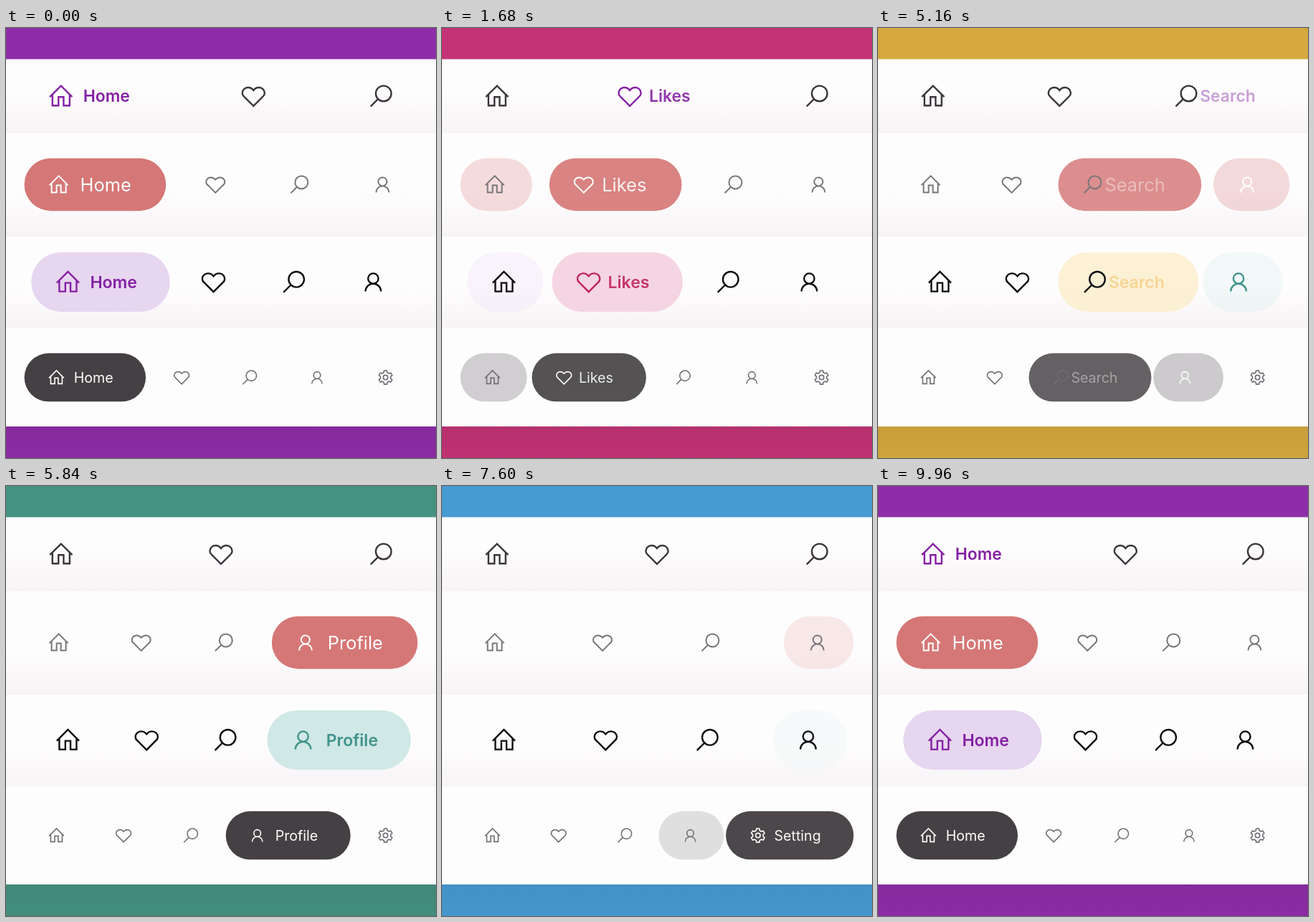
Write an HTML page with a canvas that moves like this. It is 600x600 px and loops after 10000 ms.

```html
<!DOCTYPE html>
<html lang="en">
<head>
<meta charset="utf-8">
<title>Tab bars</title>
<style>
html, body { margin: 0; width: 100%; height: 100%; overflow: hidden; background: #fff; }
canvas { display: block; width: 600px; height: 600px; }
</style>
</head>
<body>
<canvas id="stage" width="600" height="600"></canvas>
<script>
const ctx = document.getElementById('stage').getContext('2d');
const LOOP = 10000, SPAN = 750;
const FACE = 'Inter, "Open Sans", sans-serif';
const LABELS = ['Home', 'Likes', 'Search', 'Profile', 'Setting'];
const BACKS = [[142, 45, 168], [214, 53, 100], [244, 174, 48], [68, 146, 130], [71, 157, 226]];
const STEPS = [[1120, 1], [3020, 2], [5030, 3], [6970, 4], [8160, 0]]; // time, selected tab

const WHITE = [255, 255, 255], PURPLE = [132, 32, 164];
const same = c => Array(5).fill(c);
const TINTS = [PURPLE, [193, 36, 94], [243, 177, 58], [63, 147, 138], WHITE];
const PILLS = [[231, 214, 239], [244, 209, 223], [252, 238, 204], [208, 232, 230], WHITE];

const ROWS = [
  { count: 3, y: 95, left: 25.6, icon: 38.4, height: 0, gap: 25.6, pad: 45.8,
    weight: 600, home: 62.5, idle: [58, 54, 59], tint: same(PURPLE), pill: null },
  { count: 4, y: 218.4, left: 25.6, icon: 32, height: 73.5, gap: 30.5, pad: 48.5,
    weight: 400, home: 68, idle: [120, 117, 122], tint: same(WHITE), pill: same([213, 119, 118]) },
  { count: 4, y: 354.4, left: 35.2, icon: 38.4, height: 83, gap: 25.6, pad: 45.8,
    weight: 600, home: 63, idle: [14, 13, 18], tint: TINTS, pill: PILLS },
  { count: 5, y: 487.6, left: 25.6, icon: 25.6, height: 67.5, gap: 25, pad: 45.5,
    weight: 400, home: 52.5, idle: [114, 111, 116], tint: same(WHITE), pill: same([68, 64, 67]) }
];

// Icons on a 32-unit grid, stroked with a 2-unit pen
function gear() {
  let d = '';
  const put = (r, deg) => {
    const a = deg * Math.PI / 180;
    d += (d ? 'L' : 'M') + (16 + r * Math.cos(a)) + ' ' + (16 + r * Math.sin(a));
  };
  for (let a = -90; a < 270; a += 60) {
    put(9.2, a - 19); put(12.2, a - 11.5); put(12.2, a + 11.5); put(9.2, a + 19);
  }
  return d + 'Z M20 16a4 4 0 1 1-8 0a4 4 0 1 1 8 0z';
}
const ICONS = [
  'M3 17L16 4L29 17M6 14.4V27H13V17H19V27H26V14.4',
  'M9.5 6C5.9 6 3 8.9 3 12.5C3 15 5.2 16.7 5.2 16.7L16 27.5L26.8 16.7S29 15 29 12.5C29 8.9 26.1 6 22.5 6C18.5 6 16 9.3 16 9.3S13.5 6 9.5 6Z',
  'M28 13a9 9 0 1 1-18 0a9 9 0 1 1 18 0zM12.6 19.4L4 28',
  'M21 12a6 6 0 1 1-12 0a6 6 0 1 1 12 0zM6 27a9 9 0 0 1 18 0',
  gear()
].map(d => new Path2D(d));

const clamp = v => Math.max(0, Math.min(1, v));
const mix = (a, b, k) => a.map((v, i) => v + (b[i] - v) * k);
const css = (c, alpha = 1) => `rgba(${c.map(Math.round).join(',')},${alpha})`;

function bezier(x1, y1, x2, y2) {
  const at = (a, b, s) => 3 * (1 - s) * (1 - s) * s * a + 3 * (1 - s) * s * s * b + s * s * s;
  return x => {
    if (x <= 0 || x >= 1) return clamp(x);
    let lo = 0, hi = 1;
    for (let i = 0; i < 24; i++) {
      const m = (lo + hi) / 2;
      if (at(x1, x2, m) < x) lo = m; else hi = m;
    }
    return at(y1, y2, lo);
  };
}
const grow = bezier(0.4, 0, 0.2, 1);
const easeOut = bezier(0, 0, 0.58, 1);

// Size each row's type from the width of its first label
function measure() {
  for (const row of ROWS) {
    ctx.font = `${row.weight} 100px ${FACE}`;
    const m = ctx.measureText('Home');
    row.size = row.home / (m.actualBoundingBoxLeft + m.actualBoundingBoxRight) * 100;
    row.font = `${row.weight} ${row.size}px ${FACE}`;
    ctx.font = row.font;
    row.text = LABELS.map(s => ctx.measureText(s).width);
  }
}

function stateAt(t) {
  let cur = 0, prev = 4, x = 1;
  for (const [start, tab] of STEPS) {
    if (t < start) break;
    prev = cur;
    cur = tab;
    x = clamp((t - start) / SPAN);
  }
  return { cur, prev, x, open: grow(x) };
}

function fade(y0, y1, from, to) {
  const g = ctx.createLinearGradient(0, y0, 0, y1);
  g.addColorStop(0, from);
  g.addColorStop(1, to);
  ctx.fillStyle = g;
  ctx.fillRect(0, y0, 600, y1 - y0);
}

function drawBack(s) {
  ctx.fillStyle = css(mix(BACKS[s.prev], BACKS[s.cur], s.x));
  ctx.fillRect(0, 0, 600, 600);
  fade(556, 600, 'rgba(20,10,20,.07)', 'rgba(20,10,20,.03)');
  ctx.fillStyle = '#fefdfe';
  ctx.fillRect(0, 43.5, 600, 512.5);
  for (const [y0, y1] of [[85, 147], [228, 291], [362, 419]])
    fade(y0, y1, 'rgba(247,243,246,0)', 'rgb(247,243,246)');
}

// Progress of one tab: width, pill, label and icon each follow their own curve
function tabState(i, s) {
  if (i === s.cur) return {
    open: s.open, pill: easeOut(s.x), label: Math.pow(s.open, 2.5), icon: clamp(s.x * 6)
  };
  if (i === s.prev && s.x < 1) return {
    open: 1 - s.open, pill: 1 - s.x, label: Math.pow(1 - s.x, 4.5), icon: 1 - clamp(s.x * 6)
  };
  return { open: 0, pill: 0, label: 0, icon: 0 };
}

function drawIcon(i, cx, cy, size, color) {
  const k = size / 32;
  ctx.save();
  ctx.translate(cx - size / 2, cy - size / 2);
  ctx.scale(k, k);
  ctx.lineWidth = 2;
  ctx.strokeStyle = color;
  ctx.stroke(ICONS[i]);
  ctx.restore();
}

function drawRow(row, s) {
  const base = row.icon + 64;
  const tabs = [];
  let used = 0;
  for (let i = 0; i < row.count; i++) {
    const tab = tabState(i, s);
    tab.label0 = row.text[i] + row.gap;
    tab.width = base + tab.label0 * tab.open;
    used += tab.width;
    tabs.push(tab);
  }
  const space = (600 - 2 * row.left - used) / (row.count - 1);
  let x = row.left;
  tabs.forEach((tab, i) => {
    if (row.pill && tab.pill > 0) {
      ctx.fillStyle = css(row.pill[i], tab.pill);
      ctx.beginPath();
      ctx.roundRect(x, row.y - row.height / 2, tab.width, row.height, row.height / 2);
      ctx.fill();
    }
    if (tab.label > 0.004) {
      const drift = 0.18 * (1 - tab.open) * tab.label0;
      ctx.font = row.font;
      ctx.fillStyle = css(row.tint[i], tab.label);
      ctx.fillText(LABELS[i], x + tab.width - row.pad - drift - row.text[i], row.y + 0.364 * row.size);
    }
    drawIcon(i, x + base / 2, row.y, row.icon, css(mix(row.idle, row.tint[i], tab.icon)));
    x += tab.width + space;
  });
}

function frame(now) {
  const s = stateAt(now % LOOP);
  drawBack(s);
  ROWS.forEach(row => drawRow(row, s));
  requestAnimationFrame(frame);
}

measure();
frame(performance.now());
</script>
</body>
</html>
```
